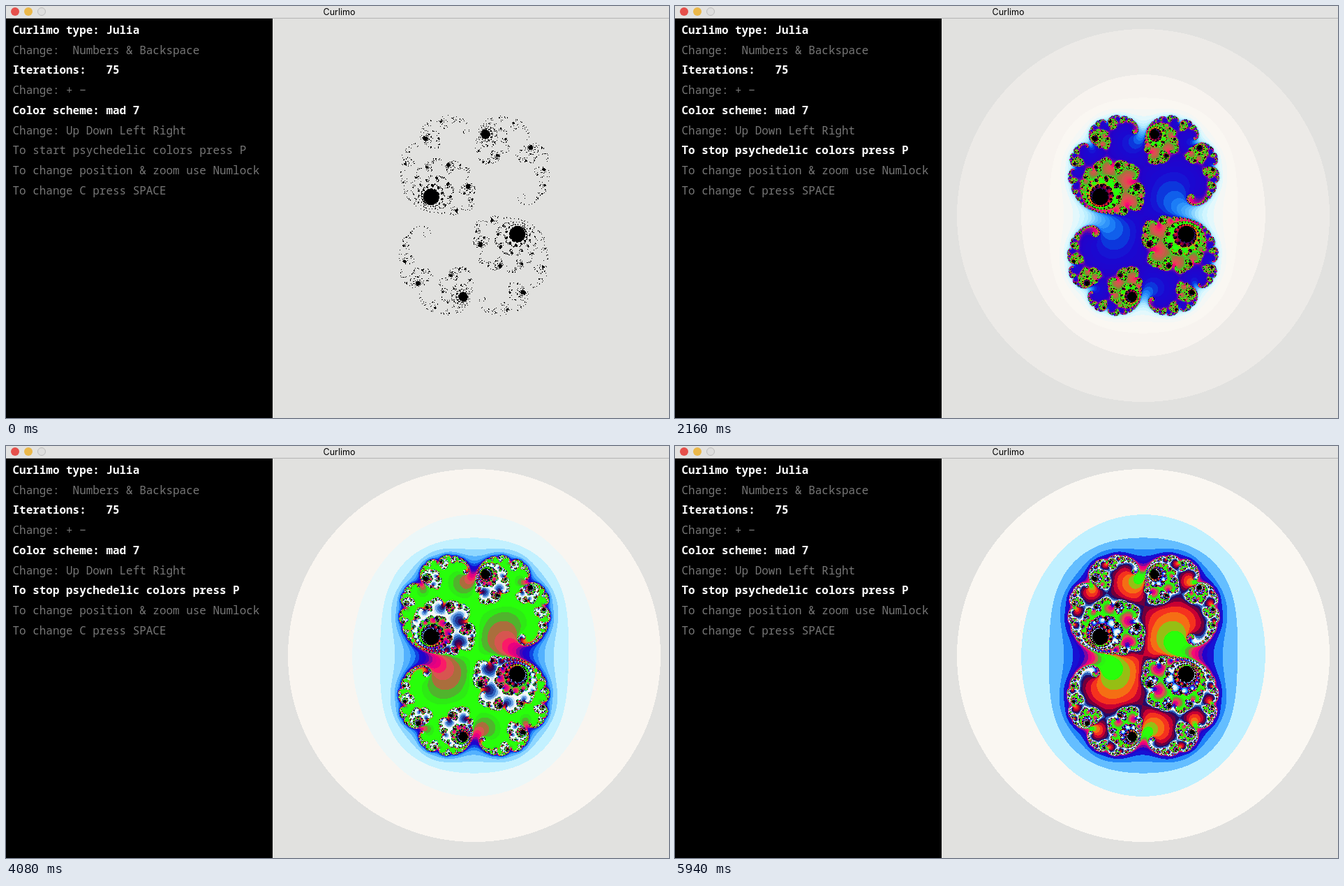
Write an HTML page with a canvas that moves like this. It is 950x590 px and loops after 6000 ms.

```html
<!DOCTYPE html>
<html>
<head>
<meta charset="utf-8">
<style>
  html, body { margin: 0; width: 950px; height: 590px; overflow: hidden; background: #e1e1df; }
  body { position: relative; }
  #bar { position: absolute; left: 0; top: 0; width: 950px; height: 17px; background: #e2e2e1; border-bottom: 1px solid #b4b4b4; }
  #bar b { position: absolute; left: 0; width: 955px; top: 0; text-align: center;
    font: 12.5px/17px Inter, "Liberation Sans", sans-serif; color: #000; }
  #bar i { position: absolute; top: 2px; width: 12px; height: 12px; border-radius: 50%; box-sizing: border-box; }
  #panel { position: absolute; left: 0; top: 18px; width: 382px; height: 572px; background: #000; color: #767676; }
  #panel div { position: absolute; left: 9.5px; white-space: pre; font: 15.95px/28px "Noto Sans Mono", "DejaVu Sans Mono", monospace; }
  #panel .on { color: #fff; font-weight: 600; }
  canvas { position: absolute; left: 382px; top: 18px; }
</style>
</head>
<body>
<div id="bar">
  <i style="left:7px;background:#e5504b"></i>
  <i style="left:26px;background:#ebb748"></i>
  <i style="left:45px;background:#dededd;border:1px solid #bcbcbc"></i>
  <b>Curlimo</b>
</div>
<div id="panel"></div>
<canvas id="view" width="568" height="572"></canvas>
<script>
const LOOP = 6000, STEP = 60, START = 10, MAX = 75;
const W = 568, H = 572, CX = 671 - 382, CY = 300 - 18, SCALE = 133.5;
const C_RE = 0.285, C_IM = 0.01;

// Gradient: position and colour; it repeats from FIRST with length PERIOD.
const FIRST = 60, PERIOD = 2170;
const stops = `0 e1e1df,60 faf6f1,95 faf7f2,116 ecf7f8,140 dcf8ff,178 c0f0ff,213 a5e4ff,267 64beff,
320 3ca0fc,360 1e82f8,390 105feb,416 0c37dc,450 190ad2,560 2600c8,610 6e0aa5,660 a50591,700 e10082,
790 f0007d,820 ff235f,870 d75550,928 aa6e3c,986 50b42d,1044 2deb14,1100 28ff0a,1370 28ff0a,1424 96be14,
1513 f56e14,1602 f5321e,1691 c80032,1780 6e003c,1840 3c0050,1880 1e0f6e,1930 1e46a0,2000 3c7dd7,
2070 b4dcf8,2130 f5f7f8,2230 faf6f1`
  .split(",").map(s => {
    const [at, hex] = s.trim().split(" "), v = parseInt(hex, 16);
    return { at: +at, rgb: [v >> 16, v >> 8 & 255, v & 255] };
  });

function shade(p) {
  if (p > FIRST) p = FIRST + (p - FIRST) % PERIOD;
  const i = Math.max(1, stops.findIndex(s => s.at >= p));
  const a = stops[i - 1], b = stops[i], f = (p - a.at) / (b.at - a.at);
  const [r, g, bl] = a.rgb.map((v, j) => Math.round(v + (b.rgb[j] - v) * f));
  return (255 << 24 | bl << 16 | g << 8 | r) >>> 0;
}

function escapeCount(x, y) {
  let n = 0;
  while (n < MAX && x * x + y * y <= 4) {
    [x, y] = [x * x - y * y + C_RE, 2 * x * y + C_IM];
    n++;
  }
  return n;
}

const counts = new Uint8Array(W * H);
for (let y = 0, i = 0; y < H; y++)
  for (let x = 0; x < W; x++)
    counts[i++] = escapeCount((x + 0.5 - CX) / SCALE, (y + 0.5 - CY) / SCALE);

const panel = document.getElementById("panel");
const lines = [
  "Curlimo type: Julia", "Change:  Numbers & Backspace", "Iterations:   75", "Change: + −",
  "Color scheme: mad 7", "Change: Up Down Left Right", "",
  "To change position & zoom use Numlock", "To change C press SPACE"
].map((text, i) => {
  const row = document.createElement("div");
  row.textContent = text;
  row.style.top = 2 + i * 28.7 + "px";
  if (i < 5 && i % 2 == 0) row.className = "on";
  return panel.appendChild(row);
});

const ctx = document.getElementById("view").getContext("2d");
const image = ctx.createImageData(W, H);
const pixels = new Uint32Array(image.data.buffer);
const lut = new Uint32Array(MAX + 1);

function draw(step) {
  const running = step >= START, speed = Math.max(0, step - START);
  lines[6].textContent = `To ${running ? "stop" : "start"} psychedelic colors press P`;
  lines[6].className = running ? "on" : "";
  for (let n = 0; n < MAX; n++) lut[n] = shade(n * speed);
  lut[MAX] = 0xff000000;
  for (let i = 0; i < pixels.length; i++) pixels[i] = lut[counts[i]];
  ctx.putImageData(image, 0, 0);
}

let last = -1;
const origin = performance.now();
function tick() {
  const step = Math.floor((performance.now() - origin) % LOOP / STEP);
  if (step != last) draw(last = step);
  requestAnimationFrame(tick);
}
tick();
</script>
</body>
</html>
```
